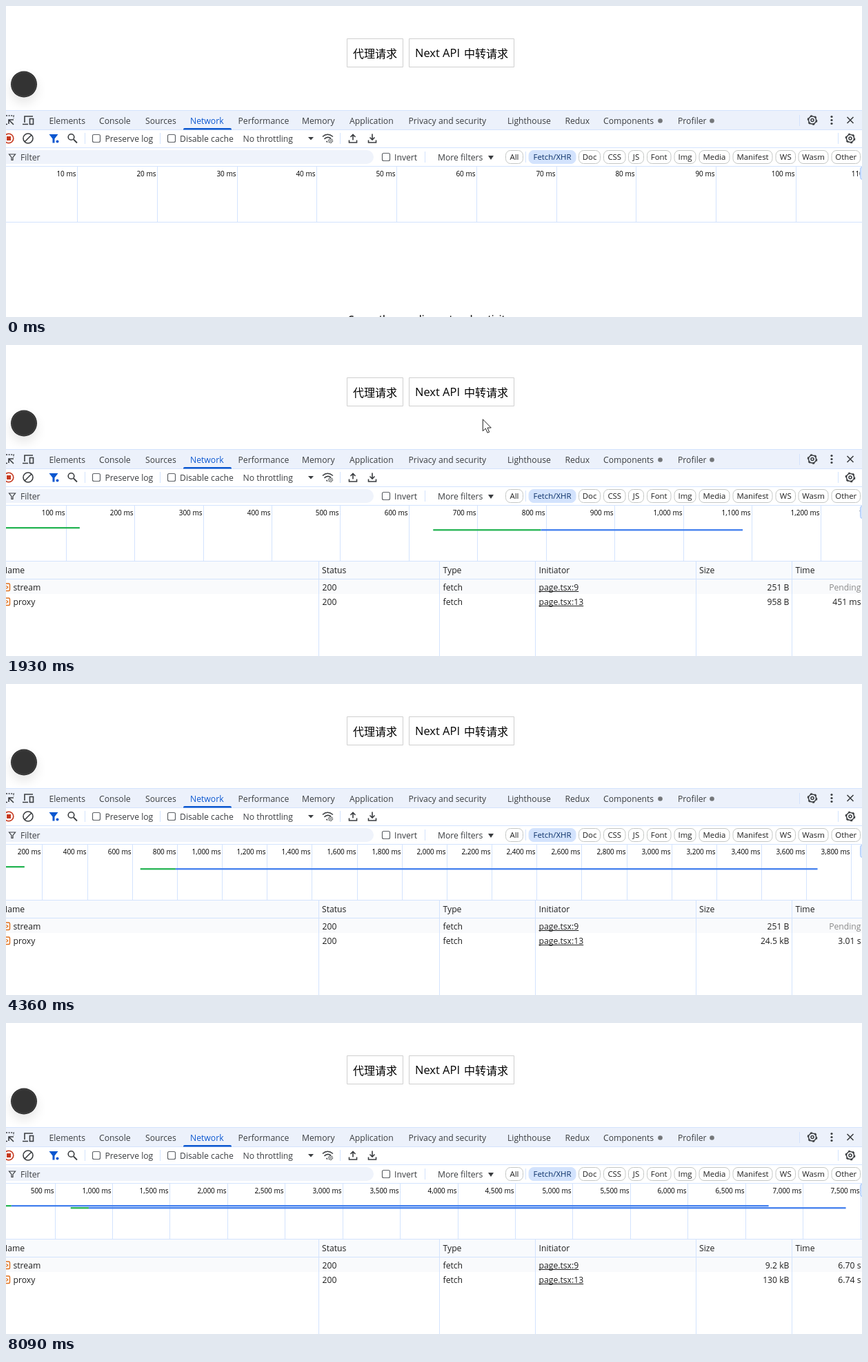
An HTML page with a canvas that plays this animation: 1241x451 px, repeating every 8.76 s.

```html
<!DOCTYPE html>
<html lang="zh">
<head>
<meta charset="utf-8">
<title>Network panel</title>
<style>
html, body { margin: 0; width: 100%; height: 100%; overflow: hidden; background: #fff; }
canvas { display: block; }
</style>
</head>
<body>
<canvas id="stage" width="1241" height="451"></canvas>
<script>
const W = 1241, H = 451, LOOP = 8760;
const c = document.getElementById('stage').getContext('2d');
const SANS = '"Open Sans", "Noto Sans", sans-serif';
const CJK = '"Noto Sans CJK SC", "Noto Sans CJK", sans-serif';
const INK = '#3a3d40', DARK = '#1f1f1f', GRAY = '#8a8a8a';
const LINE = '#d3e3fd', BLUE = '#0b57d0', ORANGE = '#e0701c';

// ---- drawing helpers ----
function text(s, x, y, { size = 12.2, color = INK, align = 'left', weight = 400, font = SANS } = {}) {
  c.font = `${weight} ${size}px ${font}`;
  c.fillStyle = color;
  c.textAlign = align;
  c.fillText(s, x, y);
}
function rect(x, y, w, h, color) {
  c.fillStyle = color;
  c.fillRect(x, y, w, h);
}
function round(x, y, w, h, r, fill, stroke, lw = 1) {
  c.beginPath();
  c.roundRect(x, y, w, h, r);
  if (fill) { c.fillStyle = fill; c.fill(); }
  if (stroke) { c.strokeStyle = stroke; c.lineWidth = lw; c.stroke(); }
}
function icon(x, y, d, { stroke = INK, fill, lw = 1.6 } = {}) {
  const p = new Path2D(d);
  c.save();
  c.translate(x, y);
  if (fill) { c.fillStyle = fill; c.fill(p); }
  if (stroke) { c.strokeStyle = stroke; c.lineWidth = lw; c.stroke(p); }
  c.restore();
}
function circle(x, y, r, fill, stroke, lw = 1.6) {
  c.beginPath();
  c.arc(x, y, r, 0, 7);
  if (fill) { c.fillStyle = fill; c.fill(); }
  if (stroke) { c.strokeStyle = stroke; c.lineWidth = lw; c.stroke(); }
}
function gear(x, y, r) {
  circle(x, y, r * .74, null, INK, r * .2);
  c.setLineDash([r * .42, r * .5]);
  circle(x, y, r * .88, null, INK, r * .2);
  c.setLineDash([]);
  circle(x, y, r * .27, null, INK, r * .2);
}
const checkbox = (x, y) => round(x + .5, y + .5, 11, 11, 2, '#fff', '#5f6368', 1.2);

// piecewise linear lookup of rows [t, a, b]
function lerp(rows, t) {
  if (t <= rows[0][0]) return rows[0].slice(1);
  const i = rows.findIndex(r => r[0] > t);
  if (i < 0) return rows.at(-1).slice(1);
  const p = rows[i - 1], q = rows[i], f = (t - p[0]) / (q[0] - p[0]);
  return p.slice(1).map((v, k) => v + (q[k + 1] - v) * f);
}

// ---- request model, all values in ms of the recording ----
const SHOW = 670, STREAM_OK = 850, PROXY_SENT = 1330, PROXY_OK = 1510;
const STREAM_TTFB = 119.7, STREAM_END = 6700, PROXY_START = 635, PROXY_TTFB = 792;

// bursts of chunks: first, last, count
const chunks = [
  [1510, 2380, 9], [2480, 2550, 2], [2660, 2990, 4], [3090, 3360, 3], [3460, 3960, 6],
  [4030, 4360, 4], [4464, 4880, 5], [5030, 5420, 5], [5560, 5690, 2], [5790, 5890, 2],
  [6030, 6300, 4], [6440, 6960, 6], [7100, 7960, 9], [8090, 8090, 1]
].flatMap(([a, b, n]) => Array.from({ length: n }, (_, i) => n > 1 ? a + (b - a) * i / (n - 1) : a));

// time, end of the proxy bar, square root of the size in kB
const progress = [
  [1510, 793, .5], [2480, 1665, 1.924], [3360, 2654, 3.435], [4360, 3648, 4.95],
  [5690, 4977, 7.113], [8090, 7371, 11.402]
];
const mouse = [
  [70, 1128, 396], [200, 880, 230], [330, 620, 105], [460, 512, 59], [670, 513, 59],
  [800, 580, 47], [930, 645, 54], [1190, 650, 55], [1330, 656, 65], [1800, 662, 70],
  [2140, 738, 168], [2210, 746, 195], [2480, 771, 257], [3020, 835, 455]
];

const sizeText = kb => kb < 1 ? Math.round(kb * 1000) + ' B' : (kb < 100 ? kb.toFixed(1) : Math.round(kb)) + ' kB';
const timeText = ms => ms < 1000 ? Math.round(ms) + ' ms' : (ms / 1000).toFixed(2) + ' s';

function state(t) {
  const tick = chunks.filter(v => v <= t).at(-1) ?? 0;
  const [end, root] = lerp(progress, tick);
  const s = { rows: [], bars: [] };
  let last = 0;
  if (t >= SHOW) {
    const ok = t >= STREAM_OK, done = t >= PROXY_OK && end >= STREAM_END;
    s.rows.push({ name: 'stream', src: 'page.tsx:9', ok,
      size: done ? '9.2 kB' : ok ? '251 B' : '0 B', time: done && timeText(STREAM_END) });
    if (ok) {
      last = STREAM_TTFB;
      s.bars.push([0, STREAM_TTFB, done ? STREAM_END : 0]);
    }
  }
  if (t >= PROXY_SENT) {
    const ok = t >= PROXY_OK;
    last = ok ? end : PROXY_START;
    s.rows.push({ name: 'proxy', src: 'page.tsx:13', ok,
      size: ok ? sizeText(root * root) : '0 B', time: ok && timeText(end - PROXY_START) });
    if (ok) s.bars.push([PROXY_START, PROXY_TTFB, end]);
  }
  // the visible span grows by a quarter whenever a bar passes its end
  s.span = 108.25;
  while (s.span < last) s.span *= 1.25;
  return s;
}

// ---- parts of the picture ----
function page(hover) {
  [[494.5, 81], [584.5, 152]].forEach(([x, w], i) =>
    round(x, 47.5, w, 41, 0, hover === i ? '#f3f3f3' : '#fff', '#cfcfcf'));
  text('代理请求', 503, 74.5, { size: 16, color: '#000', font: CJK });
  text('Next API', 593, 74, { size: 16.5, color: '#000' });
  text('中转请求', 664, 74.5, { size: 16, color: '#000', font: CJK });
  c.save();
  c.shadowColor = 'rgba(0,0,0,.1)';
  c.shadowBlur = 16;
  c.shadowOffsetY = 8;
  circle(26, 113.5, 19, '#262626');
  c.restore();
  circle(26, 113.5, 17.5, '#333', '#4a4a4a', 1);
}

function tabs() {
  rect(0, 152, W, 27, '#ecf1fb');
  rect(0, 151, W, 1, LINE);
  rect(0, 179, W, 1, LINE);
  const names = [['Elements', 62.5], ['Console', 135], ['Sources', 202], ['Network', 267], ['Performance', 336.5],
    ['Memory', 429], ['Application', 498], ['Privacy and security', 583.5], ['Lighthouse', 727],
    ['Redux', 810.5], ['Components', 866], ['Profiler', 974]];
  for (const [s, x] of names) text(s, x, 171, { color: s === 'Network' ? BLUE : INK });
  round(257, 177, 70, 2.5, [2, 2, 0, 0], BLUE);
  circle(948.5, 166.5, 3.3, '#74777a');
  circle(1023.5, 166.5, 3.3, '#74777a');
  c.setLineDash([2, 1.6]);
  icon(0, 0, 'M0 159H11V163', { lw: 1.5 });
  c.setLineDash([]);
  icon(0, 0, 'M11 172L4 165M4 171V165H11M0 171.5H2');
  icon(0, 0, 'M27 169V160H39M24 171.5H32M34.5 163.5H39.5V171.5H34.5Z');
  rect(1150, 158, 1, 16, LINE);
  gear(1169, 165.5, 7.5);
  for (const y of [160.5, 165.5, 170.5]) circle(1197, y, 1.6, INK);
  icon(1224, 165.5, 'M-4.5-4.5L4.5 4.5M4.5-4.5L-4.5 4.5');
}

function toolbar() {
  rect(0, 205, W, 1, LINE);
  circle(4, 192, 6.8, null, '#c5361b');
  rect(1, 189, 6, 6, '#c5361b');
  circle(32, 192, 7, null, INK);
  icon(32, 192, 'M-5 5L5-5');
  icon(69, 192, 'M-6.5-6H6.5L1.5.5V6.5H-1.5V.5Z', { fill: BLUE, stroke: null });
  circle(74.5, 196.5, 2, BLUE);
  circle(94.5, 190, 4.3, null, INK);
  icon(98, 193.5, 'M0 0L5 5', { lw: 1.8 });
  for (const x of [114, 223, 484]) rect(x, 184, 1, 16, LINE);
  checkbox(125, 186);
  text('Preserve log', 143.5, 197);
  checkbox(234, 186);
  text('Disable cache', 252, 197);
  text('No throttling', 343.5, 197);
  icon(442, 192, 'M-4-2H4L0 2.5Z', { fill: INK, stroke: null });
  icon(466, 192, 'M-7-2.5Q0-9 8-2.5M-4.5.8Q0-3.5 5 0M-1.5 4L0 5.5');
  gear(470.5, 195.5, 3.7);
  icon(503, 192, 'M0 2.5V-5.5M-3.5-2L0-5.5L3.5-2M-5.5 2.5V6H5.5V2.5');
  icon(531, 192, 'M0 2V-6.5M-3.5-1.5L0 2L3.5-1.5M-5.5 2.5V6H5.5V2.5');
  rect(1206, 184, 1, 16, LINE);
  gear(1224, 192, 7.5);
}

function filters() {
  round(-20, 209, 553, 20, 10, '#eff3fb');
  icon(9, 219, 'M-4.5-4H4.5L1 .5V4.5H-1V.5Z', { lw: 1.2 });
  text('Filter', 21, 223.5);
  checkbox(545, 213);
  text('Invert', 563, 223.5);
  rect(607, 211, 1, 16, LINE);
  text('More filters', 626, 223.5);
  icon(703, 219.5, 'M-4-2.5H4L0 3.5Z', { fill: INK, stroke: null });
  rect(753, 211, 1, 16, LINE);
  const chips = [['All', 724.5, 749.5], ['Fetch/XHR', 758, 826], ['Doc', 830.5, 861.5], ['CSS', 866.5, 898],
    ['JS', 902.5, 924.5], ['Font', 929.5, 964], ['Img', 969, 1000], ['Media', 1005, 1049],
    ['Manifest', 1054, 1111], ['WS', 1116, 1144.5], ['Wasm', 1149, 1192], ['Other', 1197, 1238.5]];
  for (const [s, a, b] of chips) {
    const on = s === 'Fetch/XHR';
    round(a, 209.5, b - a, 19, 7, on ? LINE : '#fff', on ? LINE : '#c4c7c5');
    text(s, (a + b) / 2, 223, { size: 11.4, align: 'center', color: on ? '#0a2f66' : DARK });
  }
}

function ruler({ span, bars }) {
  const left = -12.2, k = (W - left) / span, at = ms => left + ms * k;
  let step = 10 ** Math.ceil(Math.log10(64 / k));
  if (step * k >= 320) step /= 5;
  if (step * k >= 128) step /= 2;
  rect(0, 232, W, 1, LINE);
  for (let ms = step; at(ms) < W + 40; ms += step) {
    const x = Math.floor(at(ms) - .1);
    rect(x, 233, 1, 80, LINE);
    text(ms.toLocaleString('en-US') + ' ms', x - 1.5, 247, { size: 10, align: 'right', color: '#000' });
  }
  bars.forEach(([a, b, end], i) => {
    const y = 264 + i * 3.1;
    rect(at(a), y, at(b) - at(a), 2.3, '#25b454');
    if (end > b) rect(at(b), y, at(end) - at(b), 2.3, '#4380ee');
  });
  round(1238.5, 233.5, 8, 18, 3, LINE, '#a8c7fa');
  rect(0, 313, W, 1, LINE);
}

function table(rows) {
  if (!rows.length) {
    text('Currently recording network activity', 613.5, 458.5, { size: 13.5, weight: 600, align: 'center', color: DARK });
    return;
  }
  const dark = { color: DARK };
  rect(0, 314, W, 26, '#f8fafd');
  rect(0, 340, W, 21, '#f9fafc');
  rect(0, 339, W, 1, LINE);
  for (const x of [453, 628, 767, 1000, 1139]) rect(x, 314, 1, H - 314, LINE);
  [['Name', -7], ['Status', 458], ['Type', 633.5], ['Initiator', 772.5], ['Size', 1005], ['Time', 1144.5]]
    .forEach(([s, x]) => text(s, x, 331, dark));
  rows.forEach((r, i) => {
    const y = 355.5 + i * 21;
    if (r.ok) {
      round(-6, y - 9.5, 11.5, 10.5, 1.5, null, ORANGE, 1.4);
      icon(0, y - 4.2, 'M.5-2.2L2.7 0L.5 2.2', { stroke: ORANGE, lw: 1.3 });
    } else {
      icon(0, y - 4.5, 'M-5-5.5H1.5L5-2V5.5H-5ZM1.5-5.5V-2H5', { lw: 1.3 });
    }
    text(r.name, 10.5, y, dark);
    text(r.ok ? '200' : '(pending)', 458.5, y, { color: r.ok ? DARK : GRAY });
    text('fetch', 633.5, y, dark);
    text(r.src, 772.5, y, dark);
    rect(772.5, Math.round(y + 1), c.measureText(r.src).width, 1, DARK);
    text(r.size, 1135.5, y, { ...dark, align: 'right' });
    text(r.time || 'Pending', 1239.5, y, { align: 'right', color: r.time ? DARK : GRAY });
  });
}

function pointer(x, y, hover) {
  if (hover >= 0) {
    icon(x, y, 'M-1.7 1.5Q0-1.5 1.7 1.5V8L7 9.2Q9.3 9.8 9 12.5L8.3 17.5Q8 20 6.5 22.5H0L-5.5 14.5Q-5 12-1.7 14.5Z',
      { fill: '#fff', stroke: '#222', lw: 1.2 });
    icon(x, y, 'M1.7 8V11M4.2 8.7V11.5M6.6 9.2V12', { stroke: '#222', lw: 1 });
  } else if (y > 233 && y < 313) {
    const beam = 'M-3.5-8H-1L0-7L1-8H4.5M0-7V7M-3.5 8H-1L0 7L1 8H4.5';
    rect(Math.round(x) - 1, 233, 2, 80, BLUE);
    icon(x + 1, y, beam, { stroke: '#fff', lw: 3.2 });
    icon(x + 1, y, beam, { stroke: '#111' });
  } else {
    icon(x, y, 'M0 0V17L4 13.3L6.8 19.5L9.4 18.4L6.7 12.3H12Z', { fill: '#fff', stroke: '#222', lw: 1 });
  }
}

function draw(now) {
  const t = now % LOOP, s = state(t);
  const shown = t >= 70 && t < 3020, [x, y] = lerp(mouse, t);
  const inRow = shown && y > 47 && y < 89;
  const hover = inRow && x > 494 && x < 576 ? 0 : inRow && x > 584 && x < 737 ? 1 : -1;
  rect(0, 0, W, H, '#fff');
  page(hover);
  tabs();
  toolbar();
  filters();
  ruler(s);
  table(s.rows);
  if (shown) pointer(x, y, hover);
  requestAnimationFrame(draw);
}
requestAnimationFrame(draw);
</script>
</body>
</html>
```
